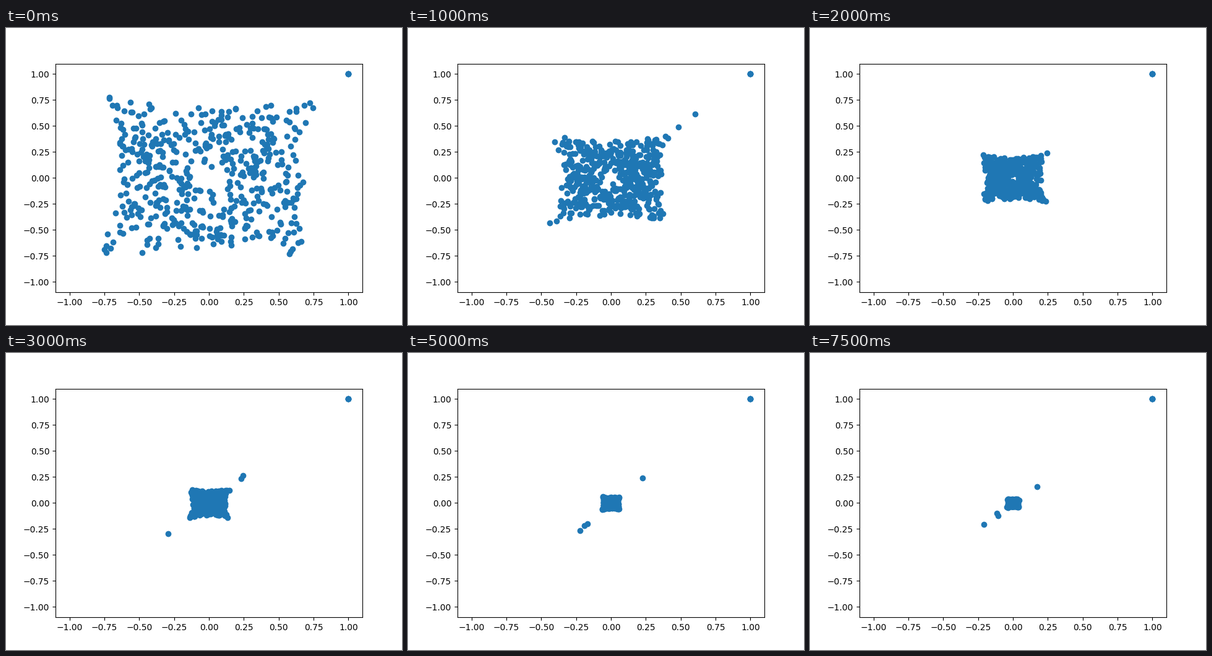
Write a matplotlib script that moves like this. It is 640 by 480 pixels and loops after 8 s.

```python
import numpy as np
import matplotlib.pyplot as plt
from matplotlib.animation import FuncAnimation

STEPS, STEP_MS = 16, 500
COUNT, STRAYS = 500, 6
HOME = [(1, 1)] * 4


def reach(step):
    """Half width of the swarm, decaying towards a small core."""
    return .038 + .762 * np.exp(-step / 2.95)


def cloud(rng, step):
    """Points on nested squares around a gap, with pulled-out corners."""
    along = rng.uniform(-1, 1, COUNT)
    size = reach(step) * (.12 + .88 * rng.beta(2, 1.5, COUNT))
    size *= .86 + .22 * along ** 4
    side = rng.choice([-1, 1], COUNT)
    upright = rng.random(COUNT) < .5
    x = size * np.where(upright, side, along)
    y = size * np.where(upright, along, side)
    return np.column_stack([x, y])


def strays(rng, step):
    """Points flung out along the diagonal, a little off it."""
    span = .2 + reach(step)
    dist = span * rng.uniform(.2, 1, STRAYS) ** 1.5
    diagonal = dist * rng.choice([-1, 1], STRAYS)
    return diagonal[:, None] + rng.normal(0, .012, (STRAYS, 2))


def swarm(step):
    rng = np.random.default_rng(step + 7)
    return np.vstack([cloud(rng, step), strays(rng, step), HOME])


fig, ax = plt.subplots(figsize=(6.4, 4.8), dpi=100)
ax.set(xlim=(-1.1, 1.1), ylim=(-1.1, 1.1))
dots = ax.scatter(*swarm(0).T, color="#1f77b4")


def update(step):
    dots.set_offsets(swarm(step))
    return dots,


anim = FuncAnimation(fig, update, frames=STEPS, interval=STEP_MS,
                     repeat=True, repeat_delay=0)
plt.show()
```
